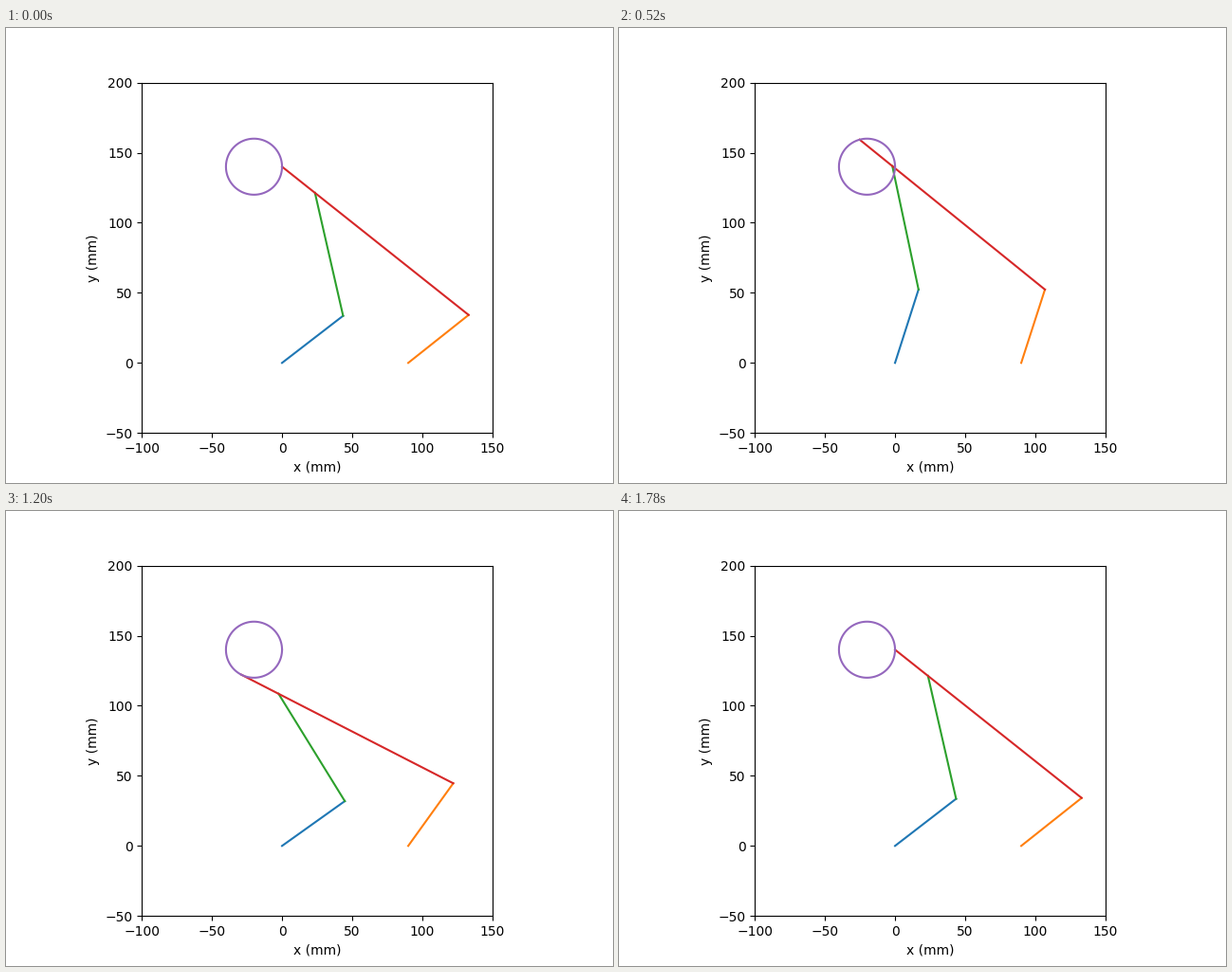
Write a matplotlib script that moves like this. It is 640x480 px and loops after 1800 ms.

```python
import numpy as np
import matplotlib.pyplot as plt
from matplotlib.animation import FuncAnimation

FRAMES, INTERVAL = 90, 20

# Five-bar linkage dimensions in mm
CRANK, LINK, ARM, TIP = 55, 90, 140, 30
LEFT, RIGHT = np.array([0.0, 0.0]), np.array([90.0, 0.0])
CENTER, RADIUS = np.array([-20.0, 140.0]), 20

theta = np.linspace(0, 2 * np.pi, FRAMES)
path = CENTER + RADIUS * np.column_stack([np.cos(theta), np.sin(theta)])


def elbow(base, end, r1, r2):
    """Joint r1 from base and r2 from end, on the right-hand side."""
    d = np.linalg.norm(end - base)
    u = (end - base) / d
    a = (r1**2 - r2**2 + d**2) / (2 * d)
    h = np.sqrt(r1**2 - a**2)
    return base + a * u + h * np.array([u[1], -u[0]])


def pose(tip):
    """Segments of left crank, right crank, link and arm."""
    right = elbow(RIGHT, tip, CRANK, ARM + TIP)
    joint = tip + (right - tip) * TIP / (ARM + TIP)
    left = elbow(LEFT, joint, CRANK, LINK)
    return (LEFT, left), (RIGHT, right), (left, joint), (right, tip)


fig, ax = plt.subplots(figsize=(6.4, 4.8), dpi=100)
ax.set_aspect("equal")
ax.set_xlim(-100, 150)
ax.set_ylim(-50, 200)
ax.set_xticks(range(-100, 151, 50))
ax.set_yticks(range(-50, 201, 50))
ax.set_xlabel("x (mm)")
ax.set_ylabel("y (mm)")

bars = [ax.plot([], [], color=f"C{i}", lw=1.5)[0] for i in range(4)]
ax.plot(*path.T, color="C4", lw=1.5)


def update(i):
    for bar, (p, q) in zip(bars, pose(path[i])):
        bar.set_data([p[0], q[0]], [p[1], q[1]])
    return bars


anim = FuncAnimation(fig, update, frames=FRAMES, interval=INTERVAL,
                     repeat=True, repeat_delay=0)
plt.show()
```
